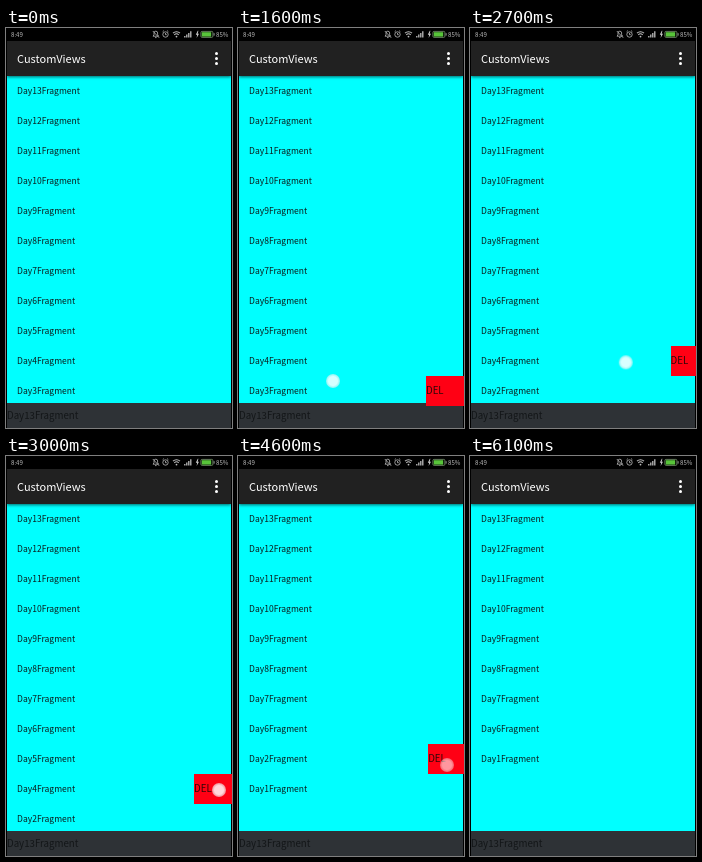
Animation of 226 by 400 pixels, one loop 6200 ms. Source, as an HTML page:

```html
<!DOCTYPE html>
<html lang="en">
<head>
<meta charset="utf-8">
<title>Swipe to delete</title>
<style>
html, body { margin: 0; width: 100%; height: 100%; overflow: hidden; background: #000; }
body { font-family: "Noto Sans CJK JP", "Noto Sans CJK SC", "Noto Sans CJK", "Noto Sans", sans-serif; }
.stage { position: relative; width: 226px; height: 400px; overflow: hidden; background: #000; }
.stage > * { position: absolute; }
.status { left: 0; top: 0; }
.status text { font-size: 6.1px; fill: #bdbdbd; }
.bar { left: 1px; right: 1px; top: 13px; height: 35px; background: #212121; z-index: 2;
  box-shadow: 0 1px 3px rgba(0, 0, 0, .6); color: #fff; font-size: 11px; line-height: 34px; text-indent: 10px; }
.bar i { position: absolute; left: 207.6px; width: 3px; height: 3px; border-radius: 50%; background: #fff; }
.list { left: 1px; right: 1px; top: 48px; height: 327px; overflow: hidden; background: #00ffff; }
.list div { height: 30px; overflow: hidden; padding-left: 10px; font-size: 8.56px; line-height: 29px; color: #0b1c1c; white-space: nowrap; }
.foot { left: 1px; right: 1px; top: 375px; height: 25px; background: #2e3236; color: #131618; font-size: 9.7px; line-height: 25px; }
.del { left: 188px; width: 38px; height: 30px; background: #ff0014; color: #2c0808; font-size: 9.7px; line-height: 29px;
  transform: translateX(38px); }
.touch { left: -7px; top: -7px; width: 14px; height: 14px; border-radius: 50%; z-index: 3; opacity: 0;
  background: radial-gradient(circle, rgba(255,255,255,.85) 0 45%, rgba(225,235,235,.55) 75%, rgba(225,235,235,.3)); }

.d3, .d4, .d5, .d2 { animation: 6.2s step-end infinite; }
.list .d3 { animation-name: cut3; }
.list .d4 { animation-name: cut4; }
.list .d5 { animation-name: cut5; }
.list .d2 { animation-name: cut2; }
@keyframes cut3 { 33.79%, to { height: 0; } }
@keyframes cut4 { 49.92%, to { height: 0; } }
@keyframes cut5 { 74.11%, to { height: 0; } }
@keyframes cut2 { 93.47%, to { height: 0; } }

.del { animation: 6.2s linear infinite; }
.s1 { top: 348px; animation-name: slide1; }
.s2 { top: 318px; animation-name: slide2; }
.s3 { top: 288px; animation-name: slide3; }
.s4 { top: 288px; animation-name: slide4; }
@keyframes slide1 {
  0%, 19.35%, 38.71%, to { transform: translateX(38px); }
  25.81%, 32.26% { transform: none; }
  33.87% { transform: translateX(2px); }
  35.48% { transform: translateX(18px); }
  37.1% { transform: translateX(33px); }
}
@keyframes slide2 {
  0%, 40.32%, 54.84%, to { transform: translateX(38px); }
  45.16%, 48.39% { transform: none; }
  50% { transform: translateX(2px); }
  51.61% { transform: translateX(18px); }
  53.23% { transform: translateX(33px); }
}
@keyframes slide3 {
  0%, 61.29%, 79.03%, to { transform: translateX(38px); }
  66.13%, 72.58% { transform: none; }
  74.19% { transform: translateX(2px); }
  75.81% { transform: translateX(18px); }
  77.42% { transform: translateX(33px); }
}
@keyframes slide4 {
  0%, 83.87%, 98.39%, to { transform: translateX(38px); }
  88.71%, 91.94% { transform: none; }
  93.55% { transform: translateX(2px); }
  95.16% { transform: translateX(18px); }
  96.77% { transform: translateX(33px); }
}

/* drag, then tap the button, four times over */
.touch { animation: move 6.2s linear infinite, fade 6.2s linear infinite; }
@keyframes move {
  0%, 19.35% { transform: translate(147px, 354px); }
  25.81%, 27.42% { transform: translate(95px, 353px); }
  30.48%, 37.1% { transform: translate(204px, 361px); }
  38.55%, 40.32% { transform: translate(192px, 335px); }
  45.16%, 45.97% { transform: translate(138px, 334px); }
  46.61%, 53.23% { transform: translate(213px, 334px); }
  59.52%, 61.29% { transform: translate(197px, 305px); }
  66.13%, 67.74% { transform: translate(142px, 304px); }
  70.81%, 77.42% { transform: translate(209px, 309px); }
  82.1%, 83.87% { transform: translate(194px, 305px); }
  88.71%, 89.52% { transform: translate(140px, 304px); }
  90.16%, to { transform: translate(209px, 307px); }
}
@keyframes fade {
  0%, 19.19%, 27.42%, 30.48%, 37.1%, 38.55%, 45.97%, 46.61%, 53.23%, 59.52%,
  67.74%, 70.81%, 77.42%, 82.1%, 89.52%, 90.16%, 96.77%, to { opacity: 0; }
  19.35%, 25.81%, 30.65%, 32.26%, 38.71%, 45.16%, 46.77%, 48.39%, 59.68%,
  66.13%, 70.97%, 72.58%, 82.26%, 88.71%, 90.32%, 91.94% { opacity: 1; }
  33.87%, 50%, 74.19%, 93.55% { opacity: .7; }
  35.48%, 51.61%, 75.81%, 95.16% { opacity: .35; }
}
</style>
</head>
<body>
<div class="stage">
  <svg class="status" width="226" height="13" fill="none" stroke="#bdbdbd" stroke-width=".8">
    <g stroke="none"><text x="5" y="8.6">8:49</text><text x="210" y="8.6">85%</text></g>
    <path d="M147 8.2h5.6l-1-1.4V5a1.8 1.8 0 0 0-3.6 0v1.8zM149 9.6h1.6M146.8 3l6.4 6.8"/>
    <circle cx="159.5" cy="6.5" r="2.7"/>
    <path d="M159.5 5v1.7h1.3M156.6 3.8l1.3-1.2M162.4 3.8l-1.3-1.2"/>
    <path d="M167 5.2a5 5 0 0 1 7 0M168.3 6.8a3.2 3.2 0 0 1 4.4 0" stroke-width="1.1"/>
    <circle cx="170.5" cy="8.6" r=".9" fill="#bdbdbd" stroke="none"/>
    <path d="M178.8 9.6V8M180.8 9.6V6.6M182.8 9.6V5M184.8 9.6V3.2" stroke-width="1.3"/>
    <path d="M191.8 2.8l-2 4h1.4l-.6 3.2 2.4-4.2h-1.4l.8-3z" fill="#d0d0d0" stroke="none"/>
    <rect x="194.9" y="3.4" width="12" height="6" rx="1.2" stroke="#7c9a70"/>
    <rect x="195.8" y="4.2" width="9.4" height="4.4" fill="#58c43a" stroke="none"/>
    <path d="M208.1 5.2v2.4"/>
  </svg>
  <div class="list">
    <div>Day13Fragment</div>
    <div>Day12Fragment</div>
    <div>Day11Fragment</div>
    <div>Day10Fragment</div>
    <div>Day9Fragment</div>
    <div>Day8Fragment</div>
    <div>Day7Fragment</div>
    <div>Day6Fragment</div>
    <div class="d5">Day5Fragment</div>
    <div class="d4">Day4Fragment</div>
    <div class="d3">Day3Fragment</div>
    <div class="d2">Day2Fragment</div>
    <div>Day1Fragment</div>
  </div>
  <div class="bar">CustomViews<i style="top:10.5px"></i><i style="top:15.5px"></i><i style="top:20.5px"></i></div>
  <div class="foot">Day13Fragment</div>
  <div class="del s1">DEL</div>
  <div class="del s2">DEL</div>
  <div class="del s3">DEL</div>
  <div class="del s4">DEL</div>
  <div class="touch"></div>
</div>
</body>
</html>
```
